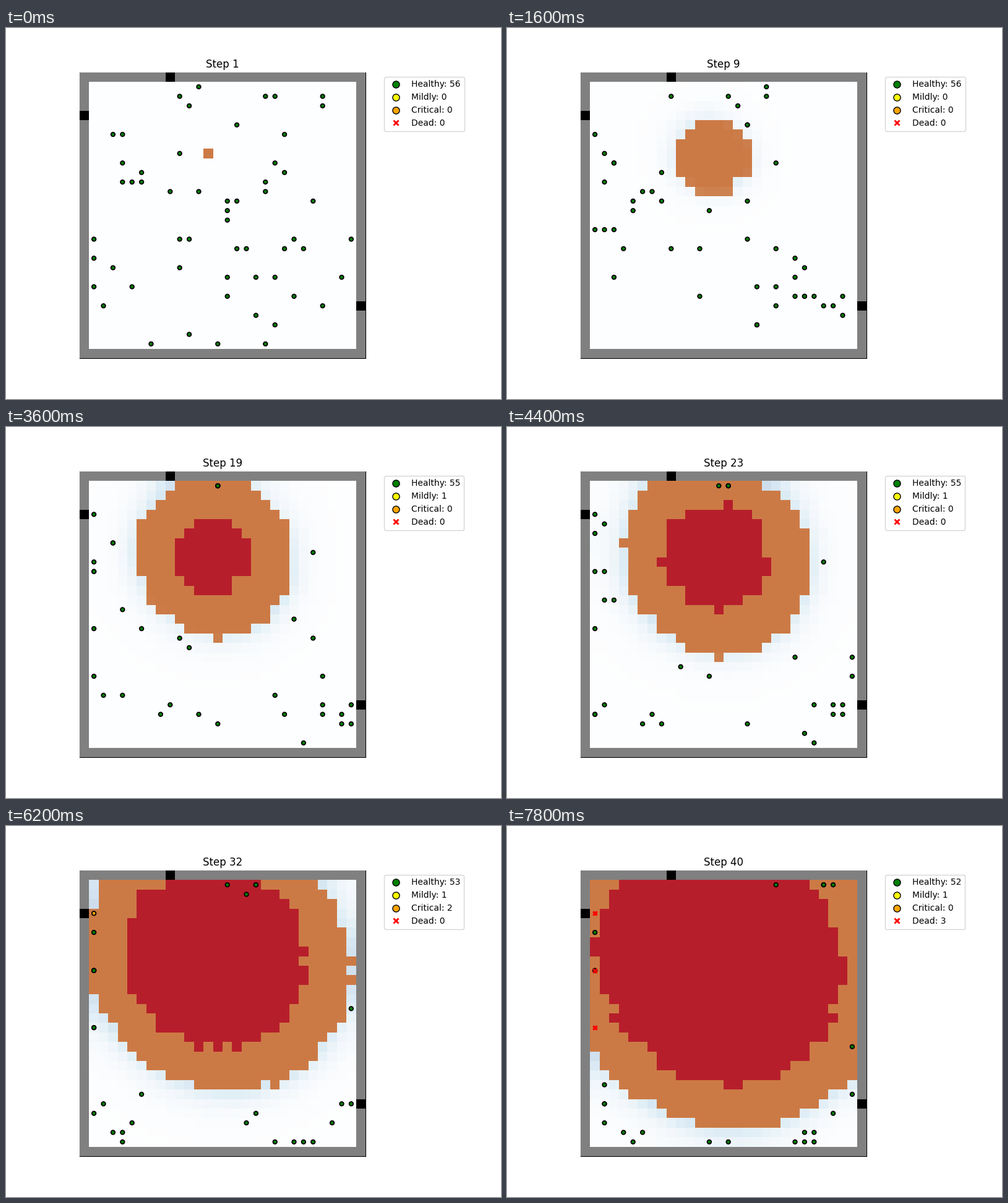
These frames come from a looping animation (800 by 600 pixels, 8 s). A matplotlib script:

```python
import numpy as np
import matplotlib.pyplot as plt
from matplotlib.animation import FuncAnimation

N, STEPS, PEOPLE = 30, 40, 56
START = np.array([13, 8])                # column, row of the first flame
EXITS = np.array([(9, 0), (0, 4), (29, 24)])
SPEED, BURN_TIME = 0.43, 10              # cells per step, steps until burnt out
TRAPPED = [((1, 4), 30), ((1, 10), 31), ((1, 16), 34)]   # place, step caught
LEAVERS, DYING_TIME, MILD_FROM = 38, 3, 17
FLAME, ASH = np.array([253, 141, 60]) / 255, np.array([227, 26, 28]) / 255
rng = np.random.default_rng(11)


def ignition_steps():
    """Step at which each cell catches fire; the front is fastest to the south-east."""
    row, col = np.mgrid[:N, :N]
    dx, dy = col - START[0], row - START[1]
    dist = np.hypot(dx, dy)
    a = np.arctan2(dy, dx)
    speed = SPEED * (1 + 0.08 * np.cos(a) + 0.07 * np.sin(a) + 0.05 * np.sin(2 * a))
    ragged = rng.uniform(-0.45, 0.45, dist.shape) * (dist > 0)
    return np.maximum(1, np.ceil((dist + ragged) / speed))


def blur(grid):
    n = len(grid)
    pad = np.pad(grid, 1, mode="edge")
    return sum(pad[i:i + n, j:j + n] for i in range(3) for j in range(3)) / 9


def smoke_steps():
    smoke = (inner <= 1).astype(float)
    out = [smoke]
    for step in range(2, STEPS + 1):
        smoke = np.clip(blur(blur(smoke)) + 0.5 * (inner <= step), 0, 1)
        out.append(smoke)
    return out


def nearest(points, pos):
    return min(points, key=lambda p: np.hypot(*(p - pos)))


class Person:
    def __init__(self, pos, goal=None, caught=None):
        self.pos, self.goal, self.caught = np.array(pos), goal, caught
        self.leaver = goal is None
        self.pull = 2 if caught else rng.uniform(0.15, 0.6)
        self.gone = False

    def color(self, step):
        if not self.caught or step < self.caught:
            return "green"
        return "orange" if step < self.caught + DYING_TIME else "red"

    def move(self, step):
        """Take the best of nine cells: near the goal, clear of fire, partly by chance."""
        goal = self.goal
        if self.leaver:
            doors = np.clip(EXITS, 1, N - 2)
            safe = ignite[doors[:, 1], doors[:, 0]] > step + 2
            goal = nearest(EXITS[safe], self.pos)

        def score(cell):
            margin = 0 if self.caught else min(ignite[cell[1], cell[0]] - step, 4)
            return 2 * margin - self.pull * np.hypot(*(goal - cell)) + rng.uniform(0, 1.5)

        around = [self.pos + (i, j) for i in (-1, 0, 1) for j in (-1, 0, 1)]
        inside = [c for c in around if 1 <= c.min() and c.max() <= N - 2]
        self.pos = max(inside, key=score)
        self.gone = self.leaver and np.abs(self.pos - goal).max() <= 1


def make_people():
    cells = [(c, r) for c in range(1, N - 1) for r in range(1, N - 1)
             if np.hypot(c - START[0], r - START[1]) > 2]
    starts = [cells[i] for i in sorted(rng.choice(len(cells), PEOPLE, replace=False))]
    n = len(TRAPPED)
    people = [Person(s, np.array(place), step)
              for s, (place, step) in zip(starts, TRAPPED)]
    # The rest either leave or wait in the lower part that burns last.
    refuge = [(c, r) for c, r in cells if r > 18 and ignite[r, c] > STEPS + 3]
    for i, s in enumerate(rng.permutation(starts[n:])):
        goal = None if i < LEAVERS else np.array(refuge[rng.integers(len(refuge))])
        people.append(Person(s, goal))
    return people


def crowd_steps():
    """Position and colour of everybody still inside, for every step."""
    people = make_people()
    out = []
    for step in range(1, STEPS + 1):
        if step > 1:
            for p in people:
                if not p.gone:
                    p.move(step)
        out.append([(p.pos, p.color(step)) for p in people if not p.gone])
    return out


ignite = ignition_steps()
inner = ignite[1:-1, 1:-1]
smoke = smoke_steps()
crowd = crowd_steps()
blues = plt.get_cmap("Blues")


def room(step):
    img = np.full((N, N, 3), 128 / 255)
    for c, r in EXITS:
        img[r, c] = 0
    base = np.ones(inner.shape + (3,))
    base[inner <= step] = FLAME
    base[inner <= step - BURN_TIME] = ASH
    img[1:-1, 1:-1] = 0.8 * base + 0.2 * blues(smoke[step - 1])[..., :3]
    return img


fig, ax = plt.subplots(figsize=(8, 6), dpi=100)
fig.subplots_adjust(right=0.75)
ax.set_xticks([])
ax.set_yticks([])
image = ax.imshow(room(1), interpolation="nearest", zorder=3)
dots = ax.scatter([], [], s=22, edgecolors="black", linewidths=1.3, zorder=4)
crosses = ax.scatter([], [], s=30, marker="X", color="red", linewidths=0.5, zorder=4)
title = ax.set_title("Step 1")

NAMES = {"Healthy": "green", "Mildly": "yellow", "Critical": "orange", "Dead": "red"}
handles = [plt.Line2D([], [], linestyle="", marker="X" if color == "red" else "o",
                      markersize=8, markerfacecolor=color,
                      markeredgecolor="white" if color == "red" else "black")
           for color in NAMES.values()]
legend = ax.legend(handles, [f"{n}: 0" for n in NAMES], loc="upper left",
                   bbox_to_anchor=(1.05, 1))


def draw(i):
    step = i + 1
    image.set_data(room(step))
    title.set_text(f"Step {step}")
    alive = [(pos, color) for pos, color in crowd[i] if color != "red"]
    dead = [pos for pos, color in crowd[i] if color == "red"]
    colors = [color for _, color in alive]
    dots.set_offsets([pos for pos, _ in alive])
    dots.set_facecolors(colors)
    crosses.set_offsets(dead if dead else np.empty((0, 2)))
    mild, critical = int(step >= MILD_FROM), colors.count("orange")
    counts = [PEOPLE - mild - critical - len(dead), mild, critical, len(dead)]
    for text, name, n in zip(legend.get_texts(), NAMES, counts):
        text.set_text(f"{name}: {n}")
    return image, dots, crosses, title, legend


anim = FuncAnimation(fig, draw, frames=STEPS, interval=200, repeat=True, repeat_delay=0)
plt.show()
```
